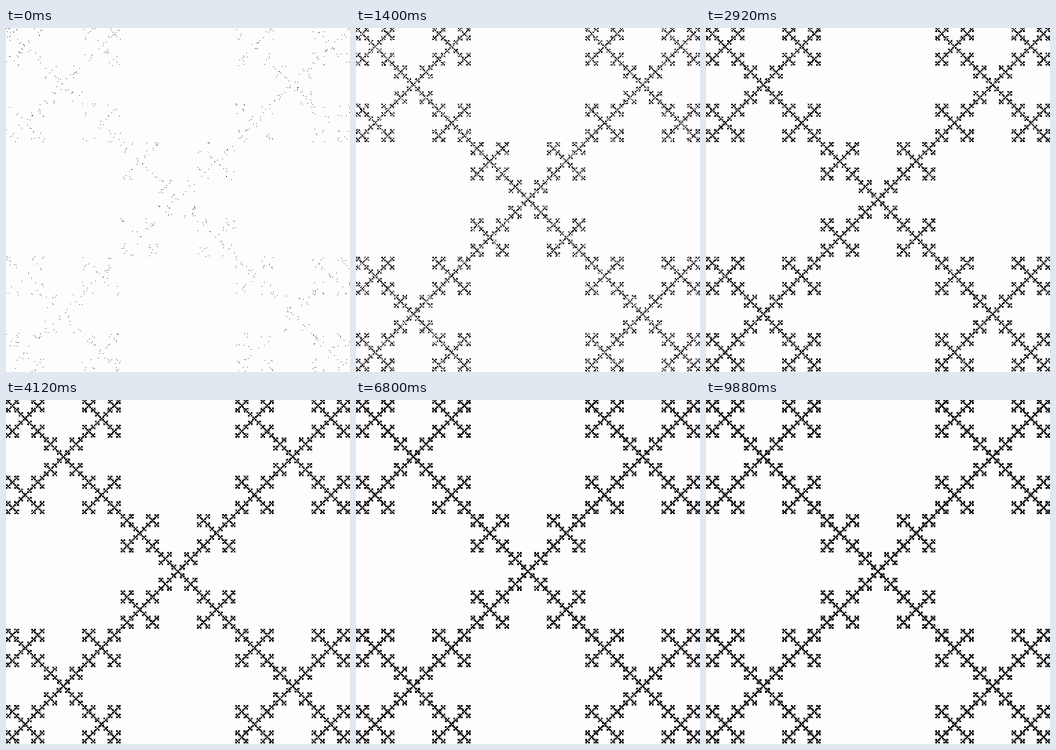
Write an HTML page with a canvas that moves like this. It is 600x600 px and loops after 9.92 s.

```html
<!DOCTYPE html>
<html lang="en">
<head>
<meta charset="utf-8">
<title>Chaos game: Vicsek fractal</title>
<style>
  html, body { margin: 0; width: 100%; height: 100%; overflow: hidden; background: #fefdfe; }
  canvas { display: block; width: 600px; height: 600px; image-rendering: pixelated; }
</style>
</head>
<body>
<canvas id="stage" width="600" height="600"></canvas>
<script>
  const SIZE = 600;
  const STEP = 40;
  const STEPS = 248;
  const POINTS = 1000;
  const ANCHORS = [[0, 0], [SIZE, 0], [0, SIZE], [SIZE, SIZE], [SIZE / 2, SIZE / 2]];

  const ctx = document.getElementById('stage').getContext('2d');
  let seed, x, y, drawn;

  // mulberry32
  function random() {
    seed = (seed + 0x6D2B79F5) | 0;
    let t = Math.imul(seed ^ (seed >>> 15), 1 | seed);
    t = (t + Math.imul(t ^ (t >>> 7), 61 | t)) ^ t;
    return ((t ^ (t >>> 14)) >>> 0) / 4294967296;
  }

  function reset() {
    seed = 2024;
    x = y = SIZE / 2;
    drawn = 0;
    ctx.fillStyle = '#fefdfe';
    ctx.fillRect(0, 0, SIZE, SIZE);
    ctx.fillStyle = '#000';
  }

  // Move two thirds of the way to a random anchor and mark the spot.
  function addPoints() {
    for (let i = 0; i < POINTS; i++) {
      const [ax, ay] = ANCHORS[Math.floor(random() * ANCHORS.length)];
      x = (x + 2 * ax) / 3;
      y = (y + 2 * ay) / 3;
      ctx.fillRect(Math.floor(x), Math.floor(y) - 1, 1, 1);
    }
    drawn++;
  }

  function render() {
    const target = Math.floor(performance.now() / STEP) % STEPS + 1;
    if (target < drawn) reset();
    while (drawn < target) addPoints();
    requestAnimationFrame(render);
  }

  reset();
  render();
</script>
</body>
</html>
```
